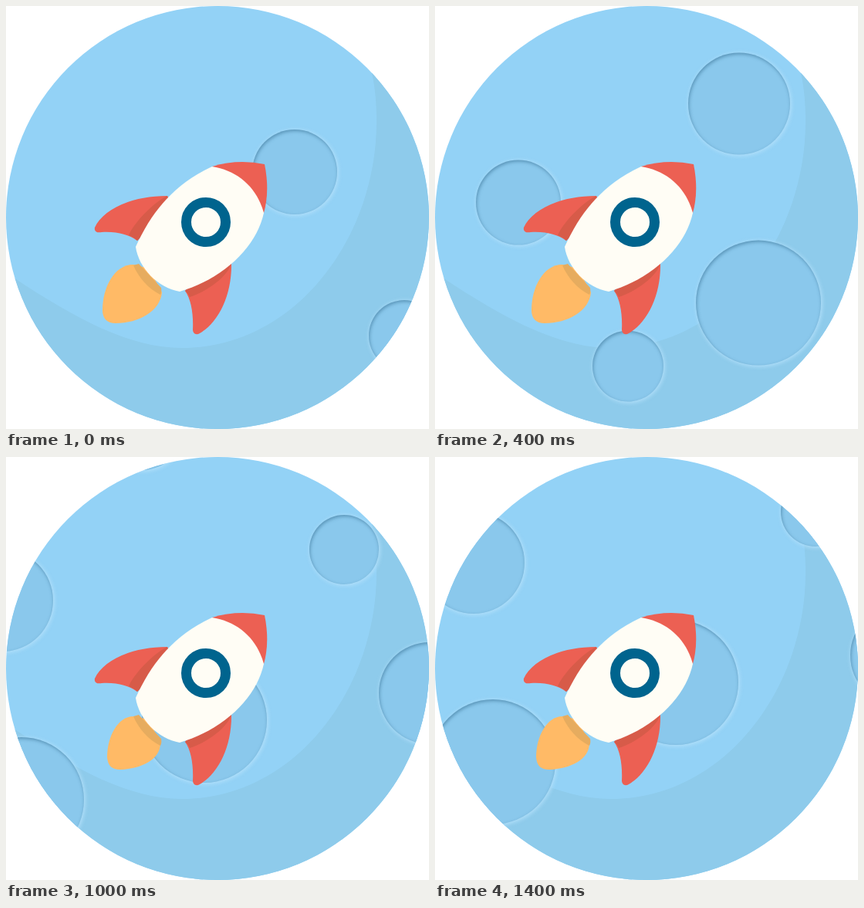
An HTML page that plays this animation: 548 px wide and 548 px high, repeating every 1.6 s.

```html
<!DOCTYPE html>
<html lang="en">
<head>
<meta charset="utf-8">
<title>Rocket</title>
<style>
  html, body { margin: 0; width: 100%; height: 100%; overflow: hidden; background: #fff; }
  #sky { position: relative; width: 548px; height: 548px; border-radius: 50%; overflow: hidden; background: #93d2f6; }
  svg, #craters { position: absolute; left: 0; top: 0; }
  #craters i {
    position: absolute; border-radius: 50%; background: #8ac8ec;
    box-shadow: inset 1px 2px 4px rgba(50, 105, 140, .55), 1px 1px 5px 1px rgba(180, 224, 250, .85);
  }
</style>
</head>
<body>
<div id="sky">
  <svg width="548" height="548">
    <path fill="#8ecbeb" d="M10 352C90 405 160 443 228 443C375 443 480 300 480 150C480 125 478 105 474 87L548 60V548H0V345Z"/>
  </svg>
  <div id="craters"></div>
  <svg width="548" height="548">
    <path id="flame" fill="#ffba66"/>
    <path fill="#e6ac5f" d="M165 336C172 352 184 366 200 374Q202 371 201 365L172 334Z"/>
    <g fill="#ec6053">
      <path d="M209 246C160 246 125 265 115 287C114 293 119 294 124 293C145 292 158 296 170 304L215 260Z"/>
      <path d="M292 332C293 375 275 410 251 424C246 427 242 424 242 419C243 400 240 380 232 369L270 330Z"/>
      <path d="M267 208Q300 198 335 205Q342 240 334 268L300 250Z"/>
    </g>
    <g fill="#d75b49">
      <path d="M209 246C190 255 165 282 159 297Q165 299 170 304L215 260Z"/>
      <path d="M292 332C290 347 265 368 238 377Q236 372 232 369L270 330Z"/>
    </g>
    <path fill="#fffdf5" d="M267 208C300 213 325 235 334 268C325 310 285 352 225 370C197 365 172 340 168 312C187 270 215 232 267 208Z"/>
    <circle cx="259" cy="280" r="25.5" fill="#fffdf5" stroke="#00648e" stroke-width="13"/>
  </svg>
</div>
<script>
  const STEP = 200, STEPS = 8;
  const field = document.getElementById('craters');
  const flame = document.getElementById('flame');
  const flames = [
    'M165 335C140 335 125 365 125 394C125 405 131 411 142 411C172 411 200 395 202 371L185 340Z',
    'M165 336C145 336 131 362 131 389C132 400 137 405 148 405C175 404 200 392 200 371L185 340Z'
  ];

  // x, y, radius relative to the moving field
  const craters = [
    [-548, -27, 55], [-406, 185, 46], [-262, -155, 66], [-237, 103, 81],
    [0, 0, 81], [181, -221, 45], [292, -35, 66], [-81, -379, 55]
  ];
  for (const [x, y, r] of craters) {
    const c = field.appendChild(document.createElement('i'));
    c.style.cssText = `left:${x - r}px;top:${y - r}px;width:${2 * r}px;height:${2 * r}px`;
  }

  function draw(now) {
    const n = Math.floor(now / STEP) % STEPS;
    // steady drift, then a jump on the last step
    const [x, y] = n < 7 ? [922 - 133 * n, 242 + 19.8 * n] : [312, 292];
    field.style.transform = `translate(${x}px,${y}px)`;
    flame.setAttribute('d', flames[n % 2]);
  }

  const start = performance.now();
  function tick() {
    draw(performance.now() - start);
    requestAnimationFrame(tick);
  }
  tick();
</script>
</body>
</html>
```
